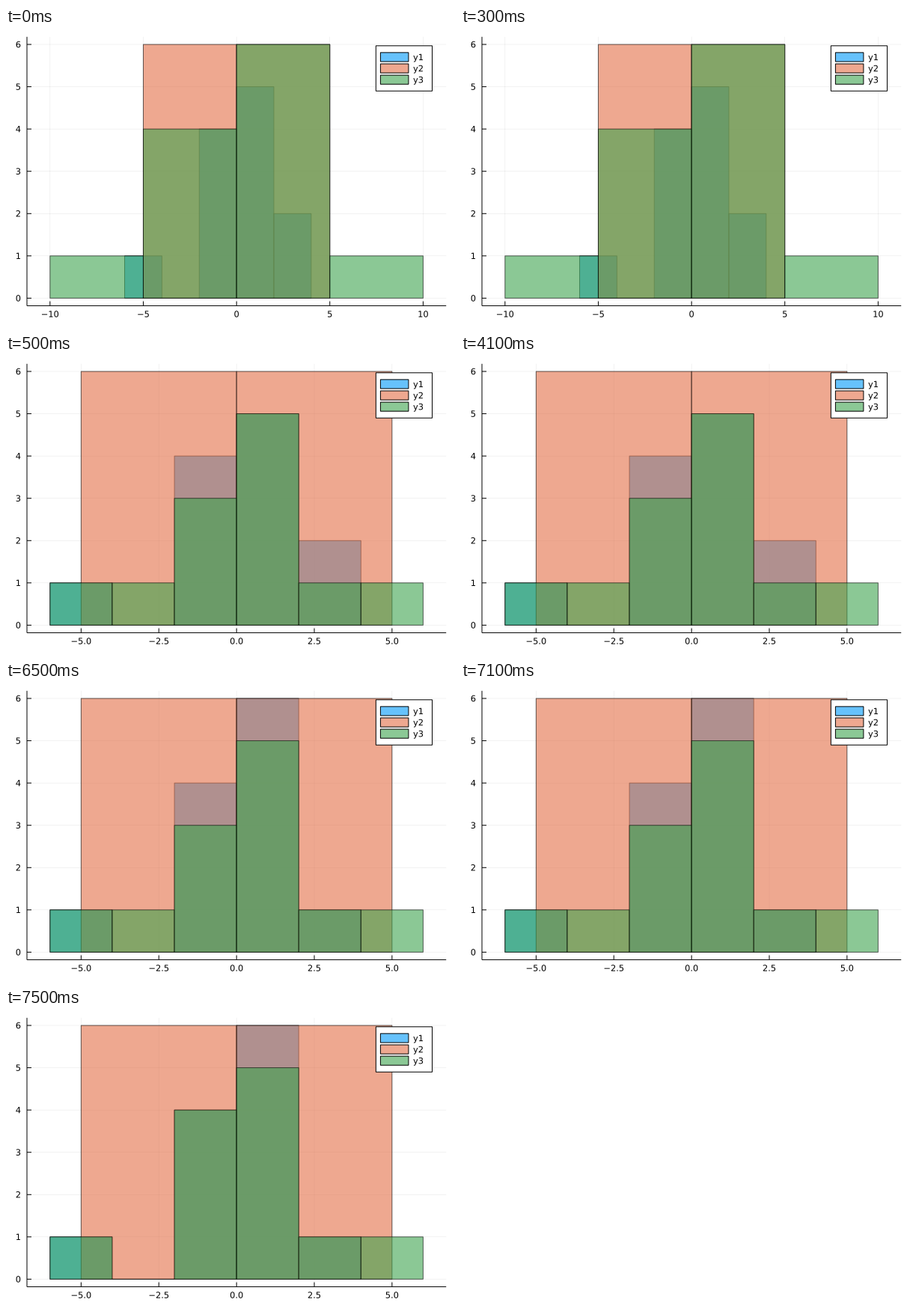
A matplotlib script for the animation above (8 s loop, 600 px wide and 400 px high).

```python
import matplotlib.pyplot as plt
from matplotlib.animation import FuncAnimation
from matplotlib.patches import PathPatch, Rectangle
from matplotlib.textpath import TextPath
from matplotlib.transforms import Affine2D

W, H, DPI = 600, 400, 100
STEP = 500
PX = 72 / DPI  # one pixel in points

plt.rcParams["font.family"] = "DejaVu Sans"
FONT_PX = 11.4
CAP_HALF = 4.15

BLUE, ORANGE, GREEN = "#009AFA", "#E36F47", "#3EA44E"
COLORS = (BLUE, ORANGE, GREEN)
ALPHA = 0.6

# Plot area; the data leave a margin inside it
LEFT, RIGHT, TOP, BOTTOM = 28.0, 588.2, 11.8, 371.6
UNIT_Y = (BOTTOM - TOP) / (6 * 1.06)
ZERO_Y = BOTTOM - 0.18 * UNIT_Y
ZERO_X = (LEFT + RIGHT) / 2
HALF_SPAN = (RIGHT - LEFT) / 2 / 1.06 ** 2
TICK = 6

WIDE_TICKS = [(v, str(v)) for v in (-10, -5, 0, 5, 10)]
FINE_TICKS = [(v, f"{v:.1f}") for v in (-5.0, -2.5, 0.0, 2.5, 5.0)]

# Each histogram: first edge, bin width, counts
HALVES = (-5, 5, (6, 6))
SPREAD = (-6, 2, (1, 0, 4, 5, 2))
PEAKED = (-6, 2, (1, 0, 4, 6, 1))
FLAT = (-6, 2, (1, 1, 3, 5, 1, 1))

# Each scene: duration in ms, largest |x|, x ticks, three histograms
SCENES = [
    (500, 10, WIDE_TICKS, (SPREAD, HALVES, (-10, 5, (1, 4, 6, 1)))),
    (6000, 6, FINE_TICKS, (SPREAD, HALVES, FLAT)),
    (1000, 6, FINE_TICKS, (PEAKED, HALVES, FLAT)),
    (500, 6, FINE_TICKS, (PEAKED, HALVES, (-6, 2, (1, 0, 4, 5, 1, 1)))),
]
LOOP = sum(scene[0] for scene in SCENES)

fig = plt.figure(figsize=(W / DPI, H / DPI), dpi=DPI, facecolor="white")
ax = fig.add_axes([0, 0, 1, 1])


def line(x0, y0, x1, y1, width=1.0, alpha=1.0):
    ax.plot([x0, x1], [y0, y1], color="black", lw=width * PX, alpha=alpha,
            solid_capstyle="butt", snap=False)


def label(x, y, text, shift=0.0):
    """Text centred on y; shift is the share of its width left of x."""
    path = TextPath((0, 0), text, size=FONT_PX)
    # Minus is wider than a digit, the point half as wide
    width = FONT_PX * sum({"\u2212": 0.838, ".": 0.318, "y": 0.592}.get(c, 0.636)
                          for c in text)
    place = Affine2D().scale(1, -1).translate(x - shift * width, y + CAP_HALF)
    ax.add_patch(PathPatch(place.transform_path(path), facecolor="black",
                           lw=0, snap=False))


def box(x, y, w, h, face, face_alpha=1.0, edge_alpha=1.0):
    ax.add_patch(Rectangle((x, y), w, h, facecolor=(face, face_alpha),
                           edgecolor=("black", edge_alpha), lw=PX,
                           joinstyle="miter", snap=False))


def draw_legend():
    row = 15.12
    right, top = RIGHT - (RIGHT - LEFT) / 30, TOP + (BOTTOM - TOP) / 30
    box(right - 75.2, top, 75.2, 4 * row, "white")
    for i, color in enumerate(COLORS):
        y = top + row * (i + 1)
        box(500.4, y - 0.4 * row, 37.5, 0.8 * row, color, ALPHA)
        label(544, y, f"y{i + 1}")


def draw_scene(limit, ticks, histograms):
    unit_x = HALF_SPAN / limit

    def px(x):
        return ZERO_X + x * unit_x

    def py(y):
        return ZERO_Y - y * UNIT_Y

    for value, _ in ticks:
        line(px(value), TOP, px(value), BOTTOM, 0.5, 0.1)
    for value in range(7):
        line(LEFT, py(value), RIGHT, py(value), 0.5, 0.1)

    line(LEFT, TOP, LEFT, BOTTOM)
    line(LEFT, BOTTOM, RIGHT, BOTTOM)
    for value, text in ticks:
        line(px(value), BOTTOM, px(value), BOTTOM - TICK)
        label(px(value), 382.6, text.replace("-", "\u2212"), 0.5)
    for value in range(7):
        line(LEFT, py(value), LEFT + TICK, py(value))
        label(20, py(value), str(value), 1.0)

    for (start, width, counts), color in zip(histograms, COLORS):
        for i, count in enumerate(counts):
            box(px(start + i * width), py(count), width * unit_x,
                count * UNIT_Y, color, ALPHA, ALPHA)
    draw_legend()


def scene_at(ms):
    for duration, *scene in SCENES:
        if ms < duration:
            return scene
        ms -= duration


def update(frame):
    ax.clear()
    ax.set(xlim=(0, W), ylim=(H, 0))
    ax.axis("off")
    draw_scene(*scene_at(frame * STEP % LOOP))
    # Keep stacking in drawing order
    for order, artist in enumerate(ax.get_children()):
        if artist is not ax.patch:
            artist.set_zorder(order + 1)
    return []


anim = FuncAnimation(fig, update, frames=LOOP // STEP, interval=STEP,
                     init_func=lambda: [], repeat=True, repeat_delay=0)
plt.show()
```
